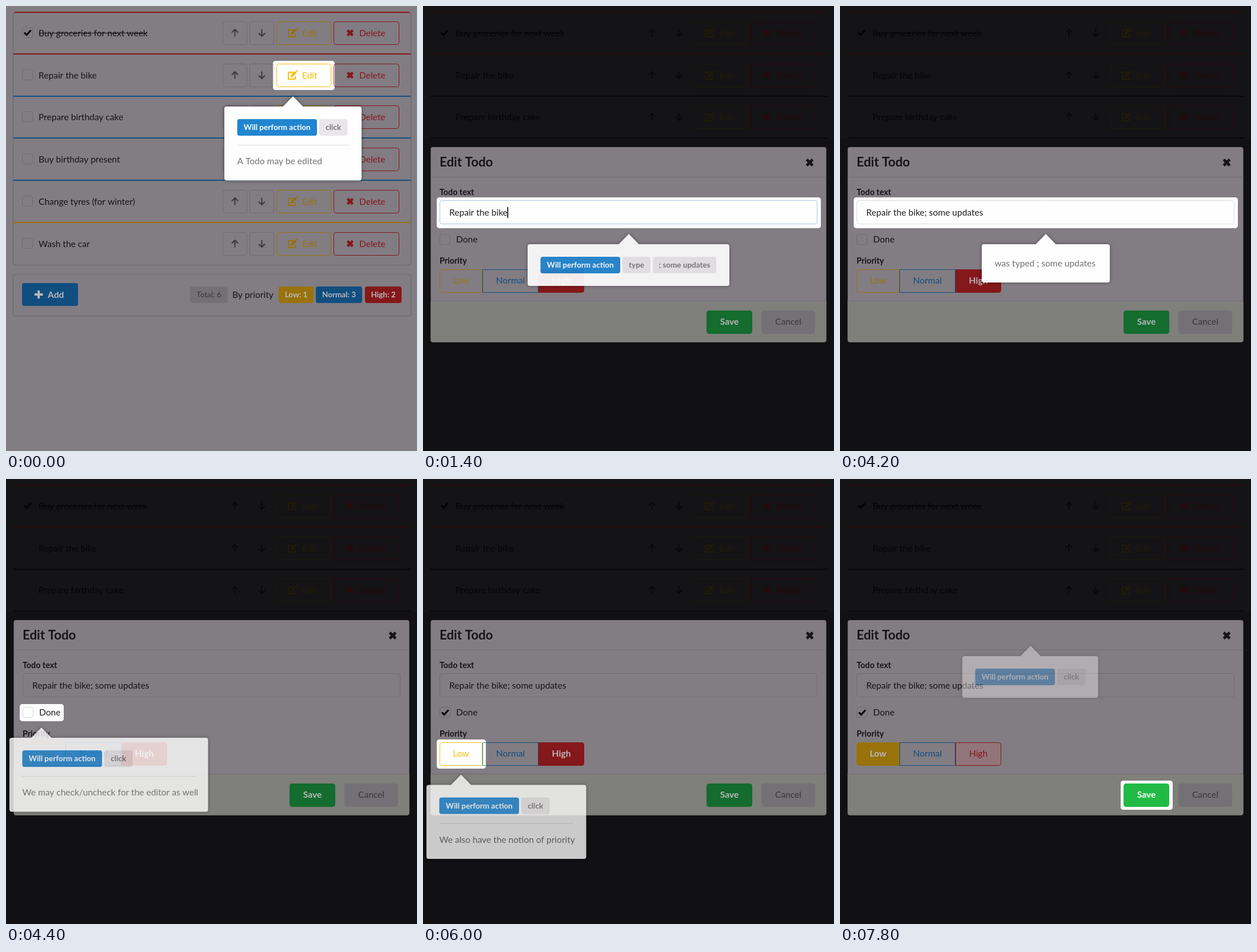
An HTML page with a canvas that plays this animation: 719x779 px, repeating every 8000 ms.

```html
<!DOCTYPE html>
<html lang="en">
<head>
<meta charset="utf-8">
<title>Todo tour</title>
<style>
html, body { margin: 0; height: 100%; overflow: hidden; background: #111113; }
canvas { position: absolute; left: 0; top: 0; }
</style>
</head>
<body>
<canvas id="stage" width="719" height="779"></canvas>
<canvas id="popup" width="719" height="779"></canvas>
<script>
const stage = document.getElementById('stage').getContext('2d');
const overlay = document.getElementById('popup').getContext('2d');
let ctx = stage;
const LOOP = 8000, BASE = 15.55;

const bright = { page: '#fefefe', foot: '#fefefe', line: '#d6dade', text: '#202021', mute: '#606061', tick: '#202021',
  chip: '#e8e6e8', on: '#fff', blue: '#2185d0', red: '#db2828', yellow: '#fbbd08', green: '#21ba45' };
const dim = { page: '#827d83', foot: '#7f7f7b', line: '#6f6b71', text: '#151416', mute: '#3a383b', tick: '#000',
  chip: '#747176', on: '#b9b7bb', blue: '#114e80', red: '#84181a', yellow: '#98730c', green: '#146c2e' };
const dark = { page: '#141315', line: '#141315', text: '#050506', mute: '#080809', tick: '#000',
  blue: '#08090c', red: '#270a0b', yellow: '#201b08' };

function box(x, y, w, h, r, fill, stroke, width = 1) {
  ctx.beginPath();
  ctx.roundRect(x, y, w, h, r);
  if (fill) { ctx.fillStyle = fill; ctx.fill(); }
  if (stroke) { ctx.strokeStyle = stroke; ctx.lineWidth = width; ctx.stroke(); }
}

function text(s, x, y, color, weight = 400, size = BASE, align = 'left') {
  ctx.font = `${weight} ${size}px Lato, sans-serif`;
  ctx.textAlign = align;
  ctx.fillStyle = color;
  ctx.fillText(s, x, y);
  return ctx.measureText(s).width;
}

function path(color, width, ...lines) {
  ctx.strokeStyle = color;
  ctx.lineWidth = width;
  ctx.beginPath();
  for (const pts of lines)
    for (let i = 0; i < pts.length; i += 2) ctx[i ? 'lineTo' : 'moveTo'](pts[i], pts[i + 1]);
  ctx.stroke();
}

function cross(x, y, r, color, width = 4.4) {
  path(color, width, [x - r, y - r, x + r, y + r], [x + r, y - r, x - r, y + r]);
}

function arrow(x, y, dir, color) {
  path(color, 2, [x, y + 6.5 * dir, x, y - 6 * dir], [x - 5.5, y - .5 * dir, x, y - 6 * dir, x + 5.5, y - .5 * dir]);
}

function editIcon(x, y, color) {
  path(color, 2, [x + 10, y - 5, x + 1, y - 5, x + 1, y + 7, x + 13, y + 7, x + 13, y + 2]);
  path(color, 4, [x + 6.5, y + 2, x + 14, y - 5.5]);
  path(color, 3.6, [x + 15, y - 6.5, x + 16.6, y - 8.1]);
  path(color, 2, [x + 4.5, y + 3.5, x + 7, y + 3.5]);
}

function checkbox(x, y, checked, p) {
  box(x + .5, y + .5, 18, 18, 3.5, p.page, p.line);
  if (checked) path(p.tick, 3, [x + 4, y + 9.5, x + 8, y + 13.5, x + 15.5, y + 5.5]);
}

function chip(s, x, y, w, fill, color, weight = 700) {
  box(x, y, w, 29, 4, fill);
  text(s, x + w / 2, y + 19.2, color, weight, 13.5, 'center');
}

function button(s, x, y, w, fill, color, border, weight = 400, r = 4) {
  box(x + .5, y + .5, w - 1, 40, r, fill, border);
  text(s, x + w / 2, y + 25.3, color, weight, BASE, 'center');
}

const todos = [['Buy groceries for next week', 'red'], ['Repair the bike', 'red'], ['Prepare birthday cake', 'blue'],
  ['Buy birthday present', 'blue'], ['Change tyres (for winter)', 'blue'], ['Wash the car', 'yellow']];

function drawList(p) {
  ctx.fillStyle = p.page;
  ctx.fillRect(0, 0, 719, 779);
  if (p !== dark) {
    box(12.5, 11.5, 696, 442, 4, null, p.line, 1.6);
    box(12.5, 469.5, 696, 73, 4, null, p.line, 1.6);
  }
  todos.forEach(([name, priority], i) => {
    const y = Math.round(47 + i * 73.7), top = Math.round(10.5 + i * 73.65);
    path(p[priority], 2, [i ? 13 : 15, top, i ? 708 : 706, top]);
    checkbox(28, y - 10, !i, p);
    const w = text(name, 57, y + 5.5, p.text);
    if (!i) path(p.text, 1.2, [57, y + .5, 57 + w, y + .5]);
    [379, 426].forEach((x, k) => {
      box(x + .5, y - 19.5, 42, 40, 4, null, p.line);
      arrow(x + 21.5, y, k ? -1 : 1, p.mute);
    });
    box(473.5, y - 19.5, 95, 40, 4, null, p.yellow);
    editIcon(493, y, p.yellow);
    text('Edit', 518, y + 5.5, p.yellow);
    box(573.5, y - 19.5, 114, 40, 4, null, p.red);
    cross(602, y, 4.6, p.red);
    text('Delete', 618, y + 5.5, p.red);
  });
  if (p === dark) return;
  box(28, 485, 98, 40, 4, p.blue);
  path(p.on, 4, [50, 505, 64.5, 505], [57.2, 498, 57.2, 512]);
  text('Add', 73, 510.5, p.on, 700);
  chip('Total: 6', 322, 491, 66, p.chip, p.mute, 400);
  text('By priority', 396, 510.5, p.text);
  chip('Low: 1', 477, 491, 61, p.yellow, p.on);
  chip('Normal: 3', 542, 491, 81, p.blue, p.on);
  chip('High: 2', 628, 491, 64, p.red, p.on);
}

function drawModal(p, t) {
  box(13.5, 247, 692, 341.5, 4, p.page);
  box(13.5, 517, 692, 71.5, [0, 0, 4, 4], p.foot);
  path(p.line, 1, [13.5, 299.5, 705.5, 299.5], [13.5, 516.5, 705.5, 516.5]);
  text('Edit Todo', 29, 281, p.text, 700, 22.3);
  cross(676.5, 274, 5.2, p.text, 4.8);

  text('Todo text', 29, 330.5, p.text, 700, 14.3);
  const focus = t < 4200 && p === bright;
  box(29.5, 340.5, 660, 41, 4, p.page, focus ? '#aac5de' : p.line);
  const w = text('Repair the bike' + (t < 2800 ? '' : '; some updates'), 46, 367, p.text);
  const caret = t < 1800 || t >= 2400 && t < 3400 || t >= 4000 && t < 4200;
  if (caret) path('#000', 1.6, [46.5 + w, 352, 46.5 + w, 371]);

  checkbox(29, 399, t >= 6000, p);
  text('Done', 58, 414.3, p.text);

  const low = t >= 7800;
  text('Priority', 29, 451.3, p.text, 700, 14.3);
  button('Low', 29, 461, 75, low ? p.yellow : null, low ? p.on : p.yellow, p.yellow, low ? 700 : 400, [4, 0, 0, 4]);
  button('High', 202, 461, 80, low ? '#92757a' : p.red, low ? p.red : p.on, p.red, low ? 400 : 700, [0, 4, 4, 0]);
  button('Normal', 104, 461, 98, null, p.blue, p.blue, 400, 0);

  button('Save', 496, 533, 80, p.green, p.on, p.green, 700);
  button('Cancel', 592, 533, 94, p.chip, p.mute, p.chip);
}

function drawPopup({ at: [x, y, w, h], tip, chips, note, alpha = 1 }) {
  ctx.canvas.style.opacity = alpha;
  ctx.clearRect(0, 0, 719, 779);
  ctx.save();
  ctx.shadowColor = 'rgba(0,0,0,.4)';
  ctx.shadowBlur = 6;
  ctx.fillStyle = '#fefefe';
  ctx.beginPath();
  ctx.roundRect(x, y, w, h, 4);
  ctx.moveTo(tip, y - 18);
  ctx.lineTo(tip + 18, y + .5);
  ctx.lineTo(tip - 18, y + .5);
  ctx.fill();
  ctx.restore();
  x += 22.5;
  if (chips) {
    chip('Will perform action', x, y + 22, 139.5, '#2185d0', '#fff');
    let cx = x + 143.5;
    for (const [s, cw] of chips) {
      chip(s, cx, y + 22, cw, '#e8e6e8', '#767578');
      cx += cw + 4;
    }
    if (note) path('#dededf', 1, [x, y + 67.5, x + w - 45, y + 67.5]);
  }
  if (note) text(note, x, y + (chips ? 101 : 39), '#727173');
}

const click = [['click', 49.5]];
const input = [24, 335, 672, 54];
const typing = { hole: input, at: [183, 417, 353, 73], tip: 360, chips: [['type', 49], ['; some updates', 111]] };
const typed = { hole: input, at: [248, 417, 224, 67], tip: 360, note: 'was typed ; some updates' };
const done = { hole: [24, 394, 77, 30], at: [6, 453, 347.5, 129.5], tip: 62, chips: click,
  note: 'We may check/uncheck for the editor as well' };
const low = { hole: [24, 456, 86, 51], at: [6, 535.5, 279.5, 129.5], tip: 66.5, chips: click,
  note: 'We also have the notion of priority' };

// [start, popup]: each step holds until the next one begins
const steps = [
  [0, { hole: [467, 96, 108, 51], at: [382, 176, 240, 129.5], tip: 502, chips: click, note: 'A Todo may be edited' }],
  [1400, { ...typing, alpha: .92 }],
  [1600, typing],
  [3000, { ...typed, at: [243, 408.5, 224, 67], tip: 355, alpha: .87 }],
  [3200, typed],
  [4400, { ...done, alpha: .8 }],
  [4600, done],
  [6000, { ...low, alpha: .78 }],
  [6200, low],
  [7800, { hole: [491, 528, 91, 51], at: [214, 310, 237.5, 73], tip: 333.5, chips: click, alpha: .37 }],
];

function draw(now) {
  const t = now % LOOP;
  const step = steps.findLast(s => s[0] <= t)[1];
  const editing = t >= 1400;
  ctx = stage;
  drawList(editing ? dark : dim);
  if (editing) {
    ctx.fillStyle = '#111113';
    ctx.fillRect(0, 233, 719, 546);
    drawModal(dim, t);
  }
  ctx.save();
  box(...step.hole, 5, '#fefefe');
  ctx.clip();
  editing ? drawModal(bright, t) : drawList(bright);
  ctx.restore();
  ctx = overlay;
  drawPopup(step);
}

const start = performance.now();
function frame() {
  draw(performance.now() - start);
  requestAnimationFrame(frame);
}
frame();
</script>
</body>
</html>
```
